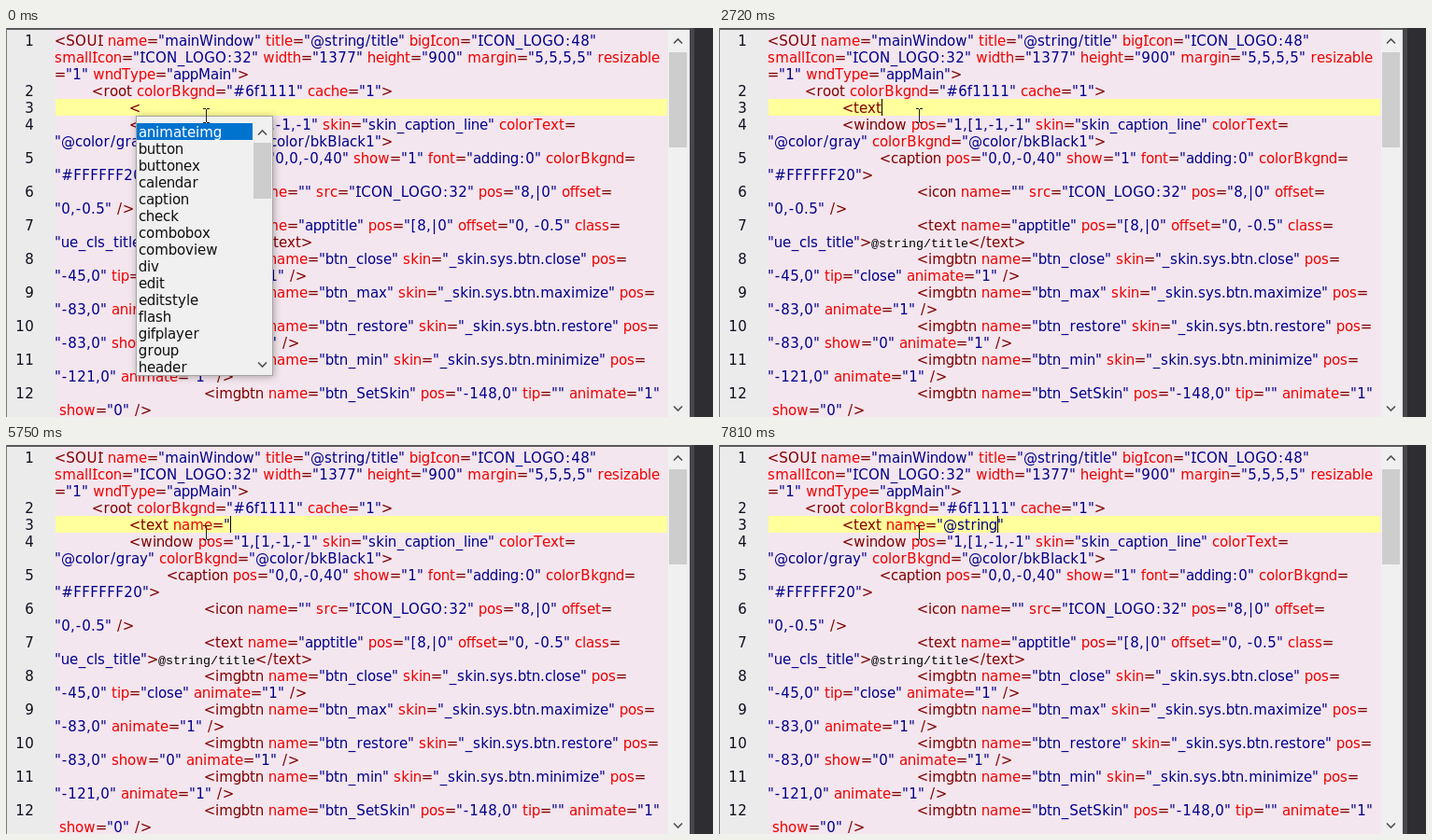
These frames come from a looping animation (757 px wide and 417 px high, 8 s). An HTML page with a canvas:

```html
<!DOCTYPE html>
<html lang="en">
<head>
<meta charset="utf-8">
<title>Code completion</title>
<style>
html, body { margin: 0; width: 100%; height: 100%; overflow: hidden; background: #ebebeb; }
canvas { display: block; }
</style>
</head>
<body>
<canvas id="stage" width="757" height="417"></canvas>
<script>
const ctx = document.getElementById('stage').getContext('2d');
const LOOP = 8000, ROW = 18, TOP = 4, LEFT = 52, TAB = 40;
const SANS = '15px "DejaVu Sans", sans-serif';
const MONO = '13.33px "Liberation Mono", monospace';
const COLOR = { tag: '#800000', attr: '#f00000', string: '#00008b', text: '#000000' };

// Whole-pixel advances of the editor face; everything else is 9 wide.
const ADVANCE = {};
const GROUPS = {
  4: 'ijl', 5: ' ,.f', 6: 'tI', 7: 'r"/:-[]|', 8: 'cszL', 10: 'S0123456789',
  11: 'BCN', 12: '<>=OGU', 13: '#wM', 15: 'mW@'
};
for (const width in GROUPS) for (const ch of GROUPS[width]) ADVANCE[ch] = +width;
const advance = ch => ADVANCE[ch] || 9;
const textWidth = text => [...text].reduce((sum, ch) => sum + advance(ch), 0);

// [line number, tab stops, code]
const rows = [
  [1, 0, '<SOUI name="mainWindow" title="@string/title" bigIcon="ICON_LOGO:48"'],
  [0, 0, 'smallIcon="ICON_LOGO:32" width="1377" height="900" margin="5,5,5,5" resizable'],
  [0, 0, '="1" wndType="appMain">'],
  [2, 1, '<root colorBkgnd="#6f1111" cache="1">'],
  [3, 2, ''],
  [4, 2, '<window pos="1,[1,-1,-1" skin="skin_caption_line" colorText='],
  [0, 0, '"@color/gray" colorBkgnd="@color/bkBlack1">'],
  [5, 3, '<caption pos="0,0,-0,40" show="1" font="adding:0" colorBkgnd='],
  [0, 0, '"#FFFFFF20">'],
  [6, 4, '<icon name="" src="ICON_LOGO:32" pos="8,|0" offset='],
  [0, 0, '"0,-0.5" />'],
  [7, 4, '<text name="apptitle" pos="[8,|0" offset="0, -0.5" class='],
  [0, 0, '"ue_cls_title">@string/title</text>'],
  [8, 4, '<imgbtn name="btn_close" skin="_skin.sys.btn.close" pos='],
  [0, 0, '"-45,0" tip="close" animate="1" />'],
  [9, 4, '<imgbtn name="btn_max" skin="_skin.sys.btn.maximize" pos='],
  [0, 0, '"-83,0" animate="1" />'],
  [10, 4, '<imgbtn name="btn_restore" skin="_skin.sys.btn.restore" pos='],
  [0, 0, '"-83,0" show="0" animate="1" />'],
  [11, 4, '<imgbtn name="btn_min" skin="_skin.sys.btn.minimize" pos='],
  [0, 0, '"-121,0" animate="1" />'],
  [12, 4, '<imgbtn name="btn_SetSkin" pos="-148,0" tip="" animate="1"'],
  [0, 0, ' show="0" />']
];
const EDIT_ROW = 4;

const words = list => list.split(' ');
const tagsTop = words('animateimg button buttonex calendar caption check combobox comboview div edit editstyle flash gifplayer group header');
const tagsEnd = words('scrollview sliderbar soui splitcol splitrow splitwnd tabctrl tabctrl2 text tileview toggle toolbox treectrl treeview window');
const attrs = words('extend font height id interHeight layout_gravity multiLines name offset pos show size skin tip visible weight width');

const popup = (x, items, thumbTop, thumbEnd) => ({ x, items, thumbTop, thumbEnd });
const tagList = popup(139, tagsTop, 123, 183);
const tagListEnd = popup(139, tagsEnd, 291, 351);
const attrList = popup(178, attrs.slice(0, 15), 175, 330);
const attrListEnd = popup(254, attrs.slice(2), 196, 351);

// [start ms, text before caret, text after caret, caret shown, popup, selected item]
const steps = [
  [0, '<', '', 0, tagList, 0],
  [450, '<', '', 1, tagList, 0],
  [600, '<t', '', 1, tagListEnd, 6],
  [1130, '<t', '', 0, tagListEnd, 6],
  [1660, '<t', '', 1, tagListEnd, 7],
  [1790, '<t', '', 1, tagListEnd, 8],
  [2190, '<t', '', 0, tagListEnd, 8],
  [2720, '<text', '', 1],
  [3290, '<text', '', 0],
  [3550, '<text ', '', 1],
  [3810, '<text n', '', 1, attrList, 7],
  [3960, '<text nam', '', 1, attrList, 7],
  [4100, '<text name', '', 1, attrList, 7],
  [4630, '<text name', '', 0, attrList, 7],
  [5040, '<text name=', '', 1],
  [5600, '<text name=', '', 0],
  [5750, '<text name="', '', 1],
  [6140, '<text name="', '"', 1],
  [6680, '<text name="', '"', 0],
  [6840, '<text name="@', '"', 1],
  [7420, '<text name="@s', '"', 1, attrListEnd, 8],
  [7680, '<text name="@stri', '"', 1, attrListEnd, 8],
  [7810, '<text name="@string', '"', 1]
];

function box(x, y, w, h, color) {
  ctx.fillStyle = color;
  ctx.fillRect(x, y, w, h);
}

function drawText(text, x, baseline, color) {
  ctx.font = SANS;
  ctx.fillStyle = color;
  for (const ch of text) {
    const step = advance(ch);
    ctx.fillText(ch, x + (step - ctx.measureText(ch).width) / 2, baseline);
    if (ch === 'I') {
      ctx.fillRect(x + 1, baseline - 11, 5, 1);
      ctx.fillRect(x + 1, baseline - 1, 5, 1);
    }
    x += step;
  }
  return x;
}

function drawCode(code, x, baseline) {
  for (const part of code.match(/"[^"]*"?|<\/?\w*|\/?>|@[\w\/]+|\w+|./g) || []) {
    if (part[0] === '@') {
      ctx.font = MONO;
      ctx.fillStyle = COLOR.text;
      ctx.fillText(part, x, baseline);
      x += 8 * part.length;
      continue;
    }
    const kind = part[0] === '"' ? 'string' : /^\w/.test(part) ? 'attr' : 'tag';
    x = drawText(part, x, baseline, COLOR[kind]);
  }
}

function chevron(x, y, dir) {
  ctx.strokeStyle = '#505050';
  ctx.lineWidth = 1.6;
  ctx.beginPath();
  ctx.moveTo(x - 4.5, y + 2.5 * dir);
  ctx.lineTo(x, y - 2 * dir);
  ctx.lineTo(x + 4.5, y + 2.5 * dir);
  ctx.stroke();
}

function drawFrame() {
  box(709, 2, 21, 415, '#f0f0f0');
  box(710, 26, 19, 102, '#cdcdcd');
  chevron(719.5, 14, 1);
  chevron(719.5, 408, -1);
  box(0, 0, 732, 2, '#5a5a5c');
  box(0, 0, 1, 417, '#77777a');
  box(732, 0, 5, 417, '#47474b');
  box(737, 0, 20, 417, '#2e2e32');
}

function drawEditor(before, after) {
  box(0, 0, 757, 417, '#ebebeb');
  box(LEFT + 1, 0, 655, 417, '#f4e6ee');
  box(LEFT + 1, TOP + EDIT_ROW * ROW, 655, ROW, '#ffff9b');
  rows.forEach(([number, tabs, code], i) => {
    const baseline = TOP + i * ROW + 15;
    if (number) {
      const label = String(number);
      drawText(label, 30 - textWidth(label), baseline, '#101020');
    }
    drawCode(i === EDIT_ROW ? before + after : code, LEFT + tabs * TAB, baseline);
  });
}

function drawPopup({ x, items, thumbTop, thumbEnd }, selected) {
  ctx.save();
  ctx.shadowColor = 'rgba(0,0,0,.3)';
  ctx.shadowBlur = 8;
  ctx.shadowOffsetX = ctx.shadowOffsetY = 1;
  box(x, 94, 147, 279, '#a5a5a5');
  ctx.restore();
  box(x + 1, 95, 145, 277, '#f0f0f0');

  ctx.save();
  ctx.beginPath();
  ctx.rect(x + 1, 95, 125, 276);
  ctx.clip();
  items.forEach((item, i) => {
    const y = 103 + i * ROW;
    if (i === selected) box(x + 1, y - 1, 124, ROW, '#0073cf');
    drawText(item, x + 3, y + 14, i === selected ? '#ffffff' : '#101010');
  });
  ctx.restore();

  box(x + 126, thumbTop, 19, thumbEnd - thumbTop, '#cdcdcd');
  chevron(x + 135.5, 112, 1);
  chevron(x + 135.5, 361, -1);
}

function drawPointer(x, y) {
  box(x, y + 1, 1, 14, '#202020');
  for (const edge of [y, y + 15]) {
    box(x - 3, edge, 3, 1, '#202020');
    box(x + 1, edge, 3, 1, '#202020');
  }
}

function render(time) {
  const step = steps.filter(s => s[0] <= time).pop();
  const [, before, after, caret, list, selected] = step;
  drawEditor(before, after);
  drawFrame();
  if (caret) box(LEFT + 2 * TAB + textWidth(before), TOP + EDIT_ROW * ROW, 1, ROW, '#000000');
  if (list) drawPopup(list, selected);
  drawPointer(214, 86);
}

const start = performance.now();
function tick() {
  render((performance.now() - start) % LOOP);
  requestAnimationFrame(tick);
}
tick();
</script>
</body>
</html>
```
